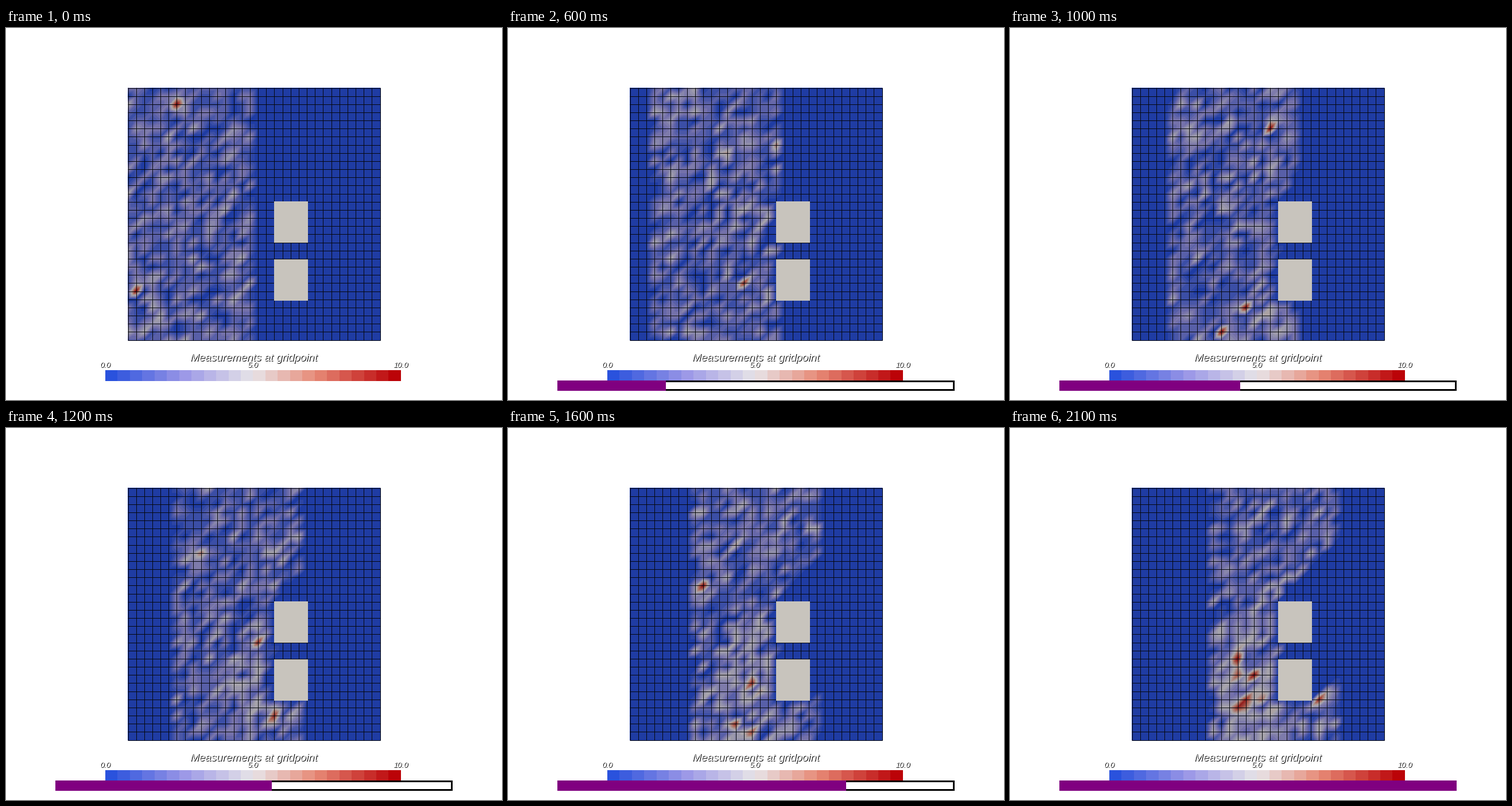
Animation, 864 px wide and 648 px high, one loop 2.2 s. Source, as a matplotlib script:

```python
import numpy as np
import matplotlib.pyplot as plt
from matplotlib.animation import FuncAnimation
from matplotlib.colors import LinearSegmentedColormap
from matplotlib.patches import Rectangle

W, H, DPI = 864, 648, 100
PX = 72 / DPI
FRAMES, STEPS = 22, 11
LEFT, TOP, SIZE, CELLS = 212, 104, 440, 31
PITCH = (SIZE - 1) / CELLS
BAND = 16
BAR_X, BAR_Y, BAR_W, BAR_H = 173, 596, 515, 19
PROG_X, PROG_Y, PROG_W, PROG_H, EDGE = 86, 614, 692, 18, 3
LEVELS = 24
LIGHT = .74

scale = LinearSegmentedColormap.from_list(
    "scale", [(0, "#2a52dd"), (.25, "#9b97e7"), (.5, "#e7e4e8"),
              (.72, "#e88c78"), (1, "#bb0308")])
COLORS = scale(np.linspace(0, 1, LEVELS))[:, :3]


def counts(step):
    """Particles per grid point: a band drifting right past two blocks."""
    rng = np.random.default_rng(40 + step)
    row, col = np.mgrid[0:CELLS + 1, 0:CELLS + 1]

    # Particles pile up in front of the blocks as time goes on
    jam = (row >= 17) & (col >= 18 - .75 * step) & (col < 19)
    crowd = max(step - 3, 0) * jam
    grid = np.minimum(rng.poisson(2 + .25 * crowd), 5)
    hot = rng.random(grid.shape) < .004 + .01 * crowd
    grid = np.where(hot, rng.integers(6, 11, grid.shape), grid)

    # The blocks cast a diagonal shadow that stays empty
    reach = (col < 18) | (row <= 31 - col) | (row >= np.minimum(27, 49 - col))
    reach |= (col == 18) & (row == 20)
    return grid * (reach & (col >= step) & (col < step + BAND))


def render(grid):
    """Linear shading over cells split along the rising diagonal."""
    pos = np.arange(SIZE) / PITCH
    i = np.minimum(pos.astype(int), CELLS - 1)
    f = pos - i
    u, v = f[None, :], f[:, None]
    a, b = grid[np.ix_(i, i)], grid[np.ix_(i, i + 1)]
    c, d = grid[np.ix_(i + 1, i)], grid[np.ix_(i + 1, i + 1)]
    upper = a + u * (b - a) + v * (c - a)
    lower = d + (1 - u) * (c - d) + (1 - v) * (b - d)
    value = np.where(u + v < 1, upper, lower) / 10
    band = np.clip((value * LEVELS).astype(int), 0, LEVELS - 1)
    return COLORS[band] * LIGHT


fig = plt.figure(figsize=(W / DPI, H / DPI), dpi=DPI, facecolor="white")
ax = fig.add_axes([0, 0, 1, 1])
ax.axis("off")


def box(x, y, w, h, color, z=1):
    return ax.add_patch(Rectangle((x, y), w, h, fc=color, lw=0, zorder=z))


def label(x, y, text, px):
    """White slanted text that shows only by its black shadow."""
    for shift, color in ((1, "black"), (0, "white")):
        ax.text(x + shift, y + shift, text, color=color, fontsize=px * PX,
                family="Liberation Sans", style="italic",
                ha="center", va="baseline", zorder=6 - shift)


fields = [render(counts(s)) for s in range(STEPS)]
image = ax.imshow(fields[0], extent=(LEFT, LEFT + SIZE, TOP + SIZE, TOP),
                  interpolation="nearest", aspect="auto", zorder=1)
ax.set(xlim=(0, W), ylim=(H, 0))

lines = .5 + np.arange(CELLS + 1) * PITCH
ax.vlines(LEFT + lines, TOP, TOP + SIZE, color="#06080f", lw=PX, zorder=2)
ax.hlines(TOP + lines, LEFT, LEFT + SIZE, color="#06080f", lw=PX, zorder=2)
for y in (302, 403):
    box(467, y, 59, 72, "#c8c4bd", 3)

ax.imshow(COLORS[None], extent=(BAR_X, BAR_X + BAR_W, BAR_Y + BAR_H, BAR_Y),
          interpolation="nearest", aspect="auto", zorder=1)
ax.set(xlim=(0, W), ylim=(H, 0))
label(432, 580, "Measurements at gridpoint", 18.8)
for value in (0, 5, 10):
    label(BAR_X + BAR_W * value / 10, 591, f"{value:.1f}", 13.4)

rim = box(PROG_X, PROG_Y, PROG_W, PROG_H, "black", 7)
hollow = box(PROG_X + EDGE, PROG_Y + EDGE, PROG_W - 2 * EDGE,
             PROG_H - 2 * EDGE, "white", 8)
fill = box(PROG_X, PROG_Y, 0, PROG_H, "#800080", 9)


def update(k):
    image.set_data(fields[k // 2])
    for part in (rim, hollow, fill):
        part.set_visible(k > 0)
    fill.set_width(PROG_W * ((k + 1) // 2) / STEPS)
    return image, rim, hollow, fill


anim = FuncAnimation(fig, update, frames=FRAMES, interval=100, repeat=True,
                     repeat_delay=0, blit=False)
plt.show()
```
